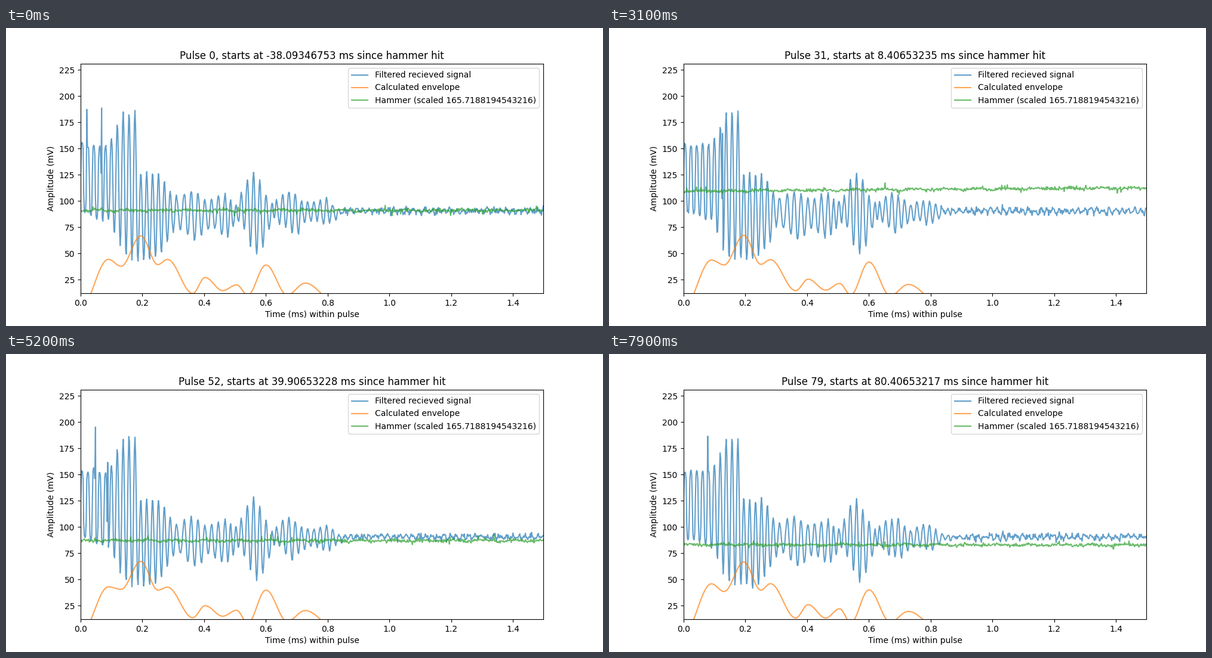
These frames come from a looping animation (1000 by 500 pixels, 8000 ms). A matplotlib script:

```python
import numpy as np
import matplotlib.pyplot as plt
from matplotlib.animation import FuncAnimation

PULSES = 80
REST = 90.5                 # resting level of the received signal, mV
t = np.arange(750) * 0.002  # ms within one pulse

# Bumps in the ringing: centre and width in cycles, height up, depth down
ECHOES = [(18, 2.2, 19, 28), (22.5, 2, 16, 25), (28, 2.1, 37, 42),
          (34, 2.2, 18, 20), (39.5, 3, 10, 13)]

# Half cycle number at the times where the ringing changes pitch
HALF_T = [-.005, .29, .31, .336, .468, .52, .6, .62, .634, .877]
HALF = [-1, 30, 32, 34, 46, 52, 60, 62, 64, 88]

# Turning points of the envelope
ENV_T = [0, .09, .131, .195, .25, .281, .363, .403, .46, .505, .541, .6, .669, .727, .83, 1.5]
ENV_V = [-2, 43.5, 39.5, 67, 40, 44, 13, 25, 14, 20.5, 9, 39.5, 9.5, 20.5, 2, 0]


def bell(x, centre, width, power=2):
    return np.exp(-np.abs((x - centre) / width) ** power)


def eased(pos, levels):
    """Cosine easing through evenly numbered levels."""
    k = np.clip(pos.astype(int), 0, len(levels) - 2)
    a, b = levels[k], levels[k + 1]
    return (a + b) / 2, (a - b) / 2, np.cos(np.pi * (pos - k))


def start_ms(n):
    return round(-38.09346753 + 1.5 * n - 0.375e-8 * n, 8)


def ring_levels():
    c = np.arange(-1, 45)
    ramp = np.clip((c - 4) / 3.5, 0, 1)
    driven = 63 + 32 * ramp ** 2 * (3 - 2 * ramp)
    up = np.where(c < 10, driven, 37 * bell(c, 11, 4.2, 4))
    down = 47 * bell(c, 9.7, 5, 4) + np.where(c < 4, 2 * c + 1, 0)
    for centre, width, high, low in ECHOES:
        shape = bell(c, centre, width) * (c > 9)
        up = up + high * shape
        down = down + low * shape
    return REST + np.column_stack([up, -down]).ravel()


LEVELS = ring_levels()


def received(n, rng):
    half = np.interp(t, HALF_T, HALF)
    mid, swing, wave = eased(half + 2, LEVELS + rng.normal(0, 1.1, LEVELS.size))
    edge = np.interp(half, [0, 8, 12], [2.3, 1.8, .3])  # square at first, then round
    y = mid + swing * np.tanh(edge * wave) / np.tanh(edge)

    tail = np.interp(t, [.8, .88], [0, 1])
    y = y + (REST - y) * tail
    y += (.7 + .7 * tail) * rng.normal(size=t.size)
    y += 1.8 * tail * np.sin(2 * np.pi * t / .0202)

    # Switching glitches fall on half cycles of the drive
    for _ in range(rng.integers(1, 3)):
        slot = rng.integers(0, 12)
        y[round(10 + 4.83 * slot)] = rng.choice([188, 188, 165, 20]) + rng.normal(0, 3)
    return y


def envelope(n, rng):
    levels = np.array(ENV_V, float)
    levels[1:-2] += rng.normal(0, 1, levels.size - 3)
    mid, swing, wave = eased(np.interp(t, ENV_T, np.arange(len(ENV_T))), levels)
    return mid + swing * wave


def hammer(n, rng):
    now = start_ms(n) + t
    hit = 136 * bell(now, 1.4, 1.2)
    y = 91 - .1 * np.maximum(now, 0) + 24 * bell(now, 12, 7.5) + hit
    y += (.6 + .015 * hit) * np.sin(2 * np.pi * t / .1 + rng.uniform(0, 2 * np.pi))
    y += rng.normal(0, .75, t.size)
    return y + (rng.random(t.size) < .07) * rng.normal(0, 2.2, t.size)


fig, ax = plt.subplots(figsize=(10, 5), dpi=100)
ax.set(xlim=(0, 1.498), ylim=(12, 230.75),
       xlabel="Time (ms) within pulse", ylabel="Amplitude (mV)")
curves = {"Filtered recieved signal": received,
          "Calculated envelope": envelope,
          "Hammer (scaled 165.7188194543216)": hammer}
lines = [ax.plot(t, 0 * t, alpha=.7, label=label)[0] for label in curves]
title = ax.set_title("")
ax.legend(loc="best")


def draw(n):
    rng = np.random.default_rng(400 + n)
    for line, curve in zip(lines, curves.values()):
        line.set_ydata(curve(n, rng))
    title.set_text(f"Pulse {n}, starts at {start_ms(n)} ms since hammer hit")
    return [*lines, title]


anim = FuncAnimation(fig, draw, frames=PULSES, init_func=lambda: draw(0),
                     interval=100, repeat=True, repeat_delay=0, blit=False)
plt.show()
```
